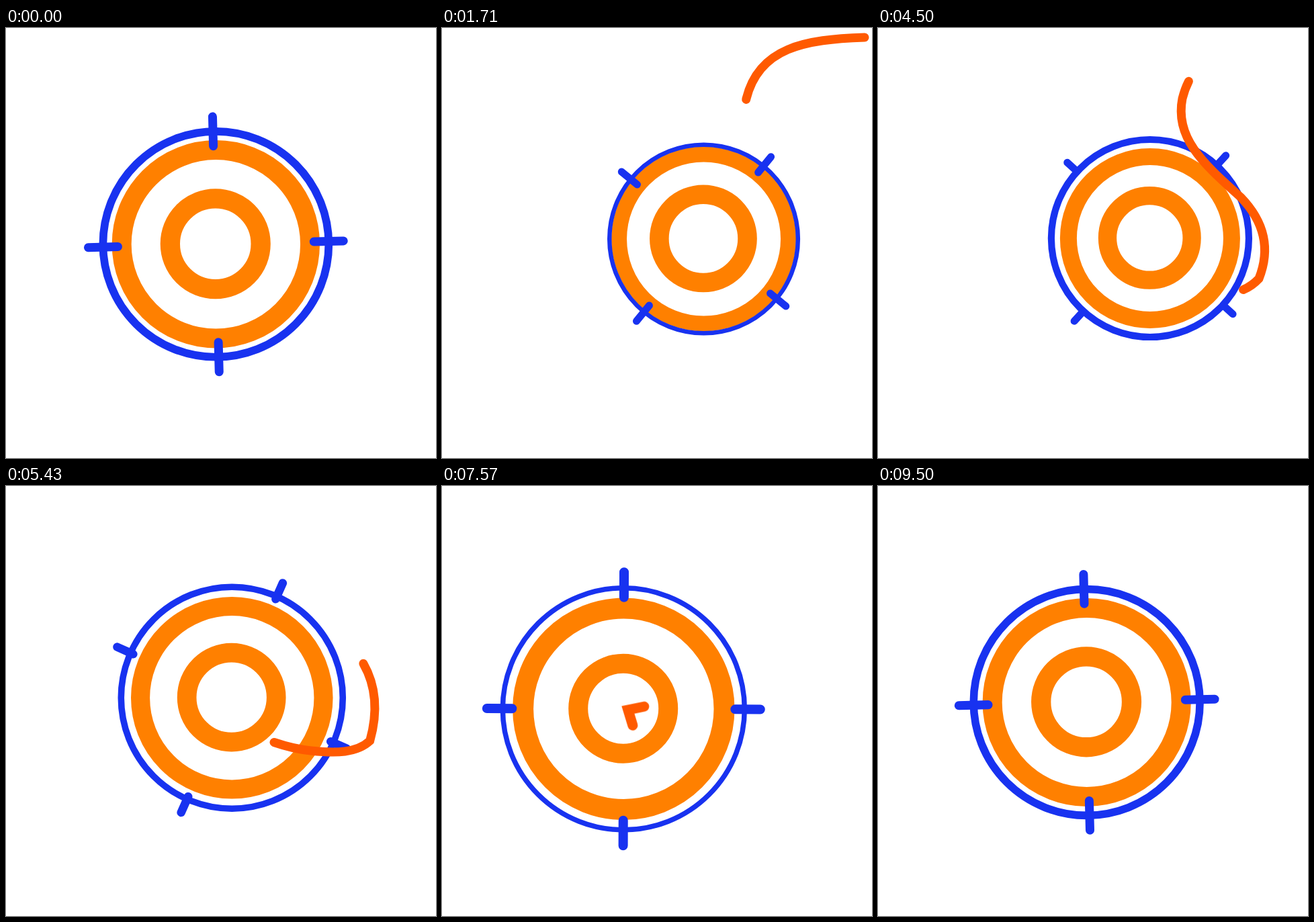
These frames come from a looping animation (640 px wide and 640 px high, 9570 ms). An HTML page without scripts:

```html
<!DOCTYPE html>
<html lang="en">
<head>
<meta charset="utf-8">
<title>Target and arrow</title>
<style>
  html, body { margin: 0; height: 100%; overflow: hidden; background: #fff; }
  svg { display: block; width: 100vw; height: 100vh; }
  svg * { animation: 9.57s linear infinite; }
  path, circle { fill: none; stroke-linecap: round; }

  .move { animation-name: move; }
  .turn { animation-name: turn; }
  .scope { stroke: #1832f0; animation-name: scope; }
  .outer { stroke: #ff8000; animation-name: outer; }
  .inner { stroke: #ff8000; animation-name: inner; }
  .tick { stroke: #1832f0; animation-name: tick; }
  .trail { stroke: #ff5a00; stroke-width: 13; animation-name: bend, trim, show-trail; }
  .head { animation-name: head; }
  .head path { stroke: #ff5a00; stroke-width: 15; vector-effect: non-scaling-stroke; }
  .sparks { animation-name: sparks; }
  .sparks path { stroke: #aaa; stroke-width: 6.5; vector-effect: non-scaling-stroke; }

  @keyframes move {
    0%, 100% { translate: 312.3px 321.8px; }
    10.45% { translate: 356px 314px; }
    17.87% { translate: 389.5px 314px; }
    20.9%  { translate: 403px 313px; }
    31.35% { translate: 444px 322px; }
    36.57% { translate: 461px 330px; }
    41.8%  { translate: 440px 321px; }
    47.02% { translate: 405px 313px; }
    52.25% { translate: 369px 312px; }
    62.7%  { translate: 293px 319.5px; }
    65.73% { translate: 269.7px 330.3px; animation-timing-function: ease-out; }
    68.65% { translate: 248px 338.5px; }
    73.15% { translate: 256px 335px; }
    79.1%  { translate: 270.3px 331.8px; }
    83.6%  { translate: 277.5px 328px; }
    94.04% { translate: 299px 323px; }
  }
  @keyframes turn {
    0%, 100% { rotate: -1.5deg; }
    17.87% { rotate: 39.3deg; }
    31.35% { rotate: 56deg; }
    36.57% { rotate: 60.4deg; }
    47.02% { rotate: 42.5deg; }
    65.73% { rotate: 6.7deg; }
    73.15% { rotate: 2deg; }
    79.1%  { rotate: .2deg; }
  }
  @keyframes scope {
    0%, 100% { r: 168px; stroke-width: 11.7px; }
    17.87% { r: 140.3px; stroke-width: 6.5px; }
    36.57% { r: 125.8px; stroke-width: 6.5px; }
    47.02% { r: 147px; stroke-width: 10.2px; }
    65.73% { r: 181.6px; stroke-width: 9px; }
    68.65% { r: 190px; stroke-width: 9px; }
    73.15% { r: 186.5px; stroke-width: 8.3px; }
    79.1%  { r: 180px; stroke-width: 7.5px; }
  }
  @keyframes outer {
    0%, 100% { r: 140.2px; stroke-width: 29px; }
    17.87% { r: 126px; stroke-width: 23px; }
    36.57% { r: 106px; stroke-width: 22px; }
    47.02% { r: 121.5px; stroke-width: 25px; }
    65.73% { r: 149.8px; stroke-width: 31px; }
    68.65% { r: 156px; stroke-width: 32px; }
    79.1%  { r: 149.7px; stroke-width: 31px; }
  }
  @keyframes inner {
    0%, 100% { r: 67.4px; stroke-width: 29.3px; }
    17.87% { r: 65.6px; stroke-width: 28.6px; }
    36.57% { r: 57.6px; stroke-width: 24.8px; }
    47.02% { r: 62.8px; stroke-width: 27.3px; }
    65.73% { r: 70px; stroke-width: 30px; }
    68.65% { r: 72px; stroke-width: 30px; }
    79.1%  { r: 67px; stroke-width: 29px; }
  }
  @keyframes tick {
    0%, 100% { d: path("M0-190V-146"); stroke-width: 13px; }
    17.87% { d: path("M0-158V-128"); stroke-width: 11px; }
    36.57% { d: path("M0-142V-122"); stroke-width: 9.5px; }
    47.02% { d: path("M0-167V-148"); stroke-width: 11px; }
    65.73% { d: path("M0-205V-172.5"); stroke-width: 14px; }
    68.65% { d: path("M0-212V-178"); stroke-width: 14.3px; }
    73.15% { d: path("M0-209V-172"); stroke-width: 14.2px; }
    79.1%  { d: path("M0-203.5V-166"); stroke-width: 14px; }
  }

  /* The flight path sways left while the arrow travels along it. */
  @keyframes bend {
    0%, 36.57% { d: path("M629 14C540 17 472 29 453 105C441 165 490 200 545 243C570 262 588 278 603 302C598 360 520 399 454 394C390 388 330 358 276 333"); }
    41.8% { d: path("M629 14C540 17 472 29 453 105C441 165 489 202 545 247C575 268 612 300 596 342C570 385 510 399 454 394C390 388 330 358 276 333"); }
    47.02% { d: path("M629 14C540 17 472 29 453 105C441 165 487 204 540 252C567 280 588 320 567 373C540 402 500 399 454 394C390 388 330 358 276 333"); }
    52.25% { d: path("M629 14C540 17 472 29 453 105C441 165 482 204 535 252C558 280 570 320 555 375C535 400 500 399 454 394C390 388 330 358 276 333"); }
    62.7% { d: path("M629 14C540 17 472 29 453 105C441 165 470 210 515 260C530 290 540 330 524 385C505 394 480 397 454 394C400 388 350 352 299 322"); }
    65.73% { d: path("M629 14C540 17 472 29 453 105C441 165 470 210 515 260C530 290 540 330 524 385C505 394 480 397 454 394C390 388 330 358 276 333"); }
    68.65% { d: path("M629 14C540 17 472 29 453 105C441 165 470 210 515 260C530 290 540 330 524 385C505 394 480 397 454 394C390 388 320 366 254 341"); }
    73.15%, 100% { d: path("M629 14C540 17 472 29 453 105C441 165 470 210 515 260C530 290 540 330 524 385C505 394 480 397 454 394C390 388 325 363 262 338"); }
  }
  /* Dash length is head minus tail; the offset is the tail. */
  @keyframes trim {
    0%, 10.1% { stroke-dasharray: 1 3000; stroke-dashoffset: 0; }
    10.45% { stroke-dasharray: 3 3000; animation-timing-function: cubic-bezier(.35, .5, .6, 1); }
    17.87% { stroke-dasharray: 217 3000; }
    20.9%  { stroke-dasharray: 229 3000; animation-timing-function: cubic-bezier(.35, .15, .75, .85); }
    31.35% { stroke-dasharray: 388 3000; }
    36.57% { stroke-dasharray: 479 3000; stroke-dashoffset: 0; animation-timing-function: ease-in; }
    41.8%  { stroke-dasharray: 450 3000; stroke-dashoffset: -64; }
    47.02% { stroke-dasharray: 368 3000; stroke-dashoffset: -188; }
    52.25% { stroke-dasharray: 284 3000; stroke-dashoffset: -312; }
    62.7%  { stroke-dasharray: 244 3000; stroke-dashoffset: -520; }
    65.73% { stroke-dasharray: 240 3000; stroke-dashoffset: -591; }
    68.65% { stroke-dasharray: 240 3000; stroke-dashoffset: -660; }
    74.2%, 100% { stroke-dasharray: 240 3000; stroke-dashoffset: -788; }
  }
  @keyframes show-trail {
    0%, 10.1% { opacity: 0; }
    10.11%, 74.2% { opacity: 1; }
    74.21%, 100% { opacity: 0; }
  }
  @keyframes head {
    0%, 62.69% { scale: .05; opacity: 0; }
    62.7%  { scale: .05; opacity: 1; }
    65.73% { scale: .83; }
    68.65%, 83.6% { scale: 1; }
    87.7%  { scale: .05; opacity: 1; }
    87.71%, 100% { scale: .05; opacity: 0; }
  }
  @keyframes sparks {
    0%, 63.6% { scale: .4; opacity: 0; }
    63.61% { scale: .4; opacity: 1; }
    65.73% { scale: 1; }
    67.9%  { scale: 1.35; opacity: 1; }
    67.91%, 100% { scale: 1.35; opacity: 0; }
  }
</style>
</head>
<body>
<svg viewBox="0 0 640 640">
  <g class="move">
    <circle class="outer"/>
    <circle class="inner" cx="-.6" cy="-.6"/>
    <circle class="scope"/>
    <g class="turn">
      <path class="tick"/>
      <path class="tick" transform="rotate(90)"/>
      <path class="tick" transform="rotate(180)"/>
      <path class="tick" transform="rotate(270)"/>
    </g>
  </g>
  <path class="trail"/>
  <g class="move">
    <g transform="translate(6.5 1.5)">
      <g class="head"><path d="M24-5L0 0L7 23"/></g>
    </g>
    <g class="sparks">
      <path d="M1-25L2-10M-20.5 0L-13 1M19.5-8L26-9.5M4 20.5L3.5 26"/>
    </g>
  </g>
</svg>
</body>
</html>
```
